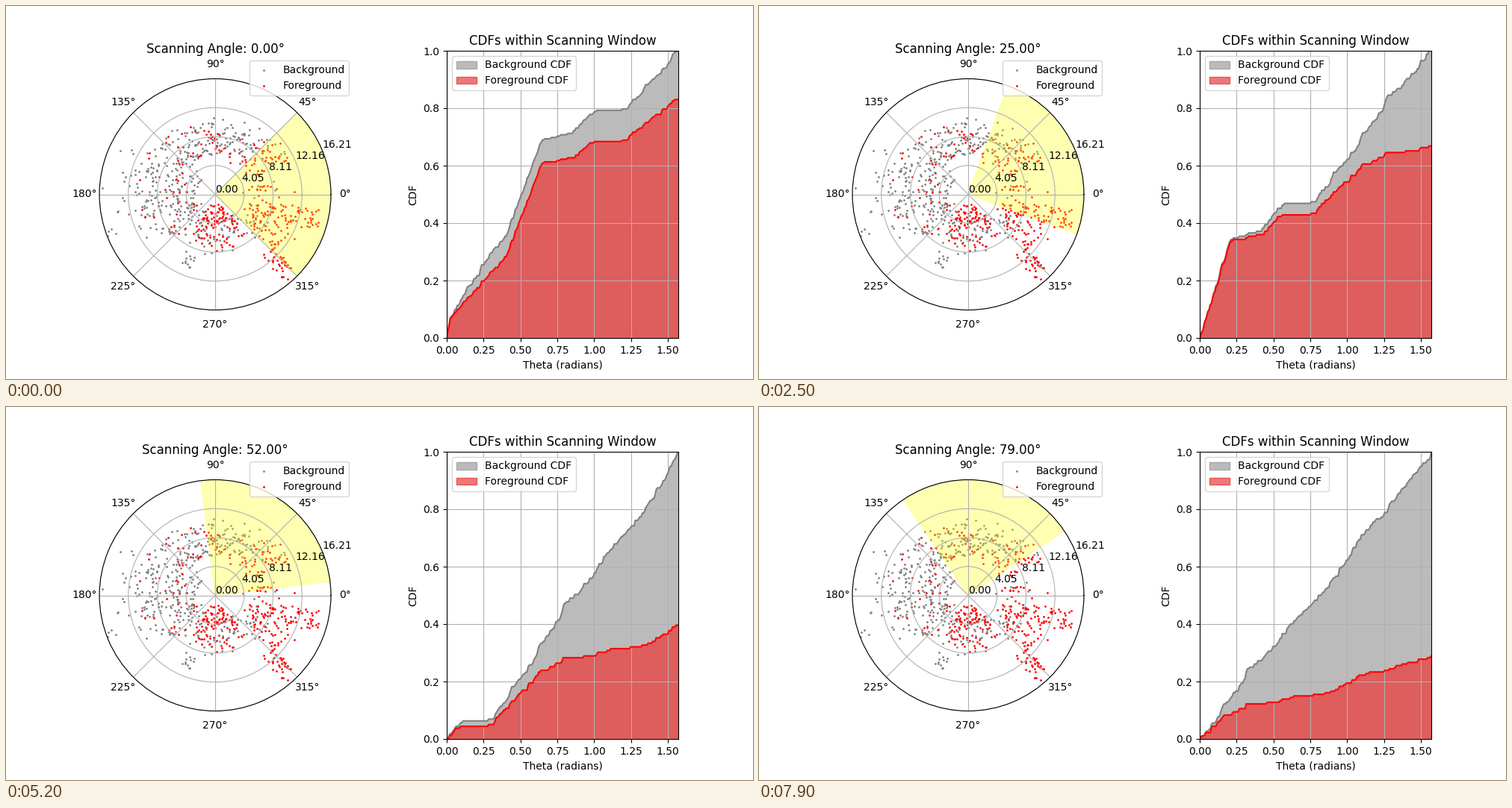
Recreate the animation shown at these times as a matplotlib script. Size 1000x500 px, loop 8000 ms.

```python
import numpy as np
import matplotlib.pyplot as plt
from matplotlib.animation import FuncAnimation
from matplotlib.patches import Patch

FRAMES, STEP_MS = 80, 100
RMAX, HALF = 16.21, 45
RADIUS_PX = 155
GREY_FILL, RED_FILL = "#bbbbbb", "#de5d5d"

# Sectors: points, first and last angle, inner and outer distance in pixels
FORE = [(22, -53, -45, 95, 150), (14, -45, -43.7, 105, 150),
        (46, -44, -22, 42, 130), (69, -22, -8, 45, 152),
        (5, -8, 5, 30, 125), (11, 5, 12, 38, 85), (28, 23, 42, 45, 112),
        (9, 42, 52, 50, 98), (10, 52, 88, 42, 92), (9, 88, 97, 55, 105),
        (12, 97, 124, 50, 100), (38, 124, 240, 20, 110),
        (98, 240, 308, 12, 78)]
BACK = [(14, -45, -28, 40, 85), (10, -28, 28, 35, 90), (8, 28, 42, 75, 115),
        (123, 42, 124, 50, 107), (165, 124, 225, 22, 112),
        (45, 150, 205, 75, 162), (12, 243, 252, 85, 106),
        (60, 225, 315, 25, 85)]

rng = np.random.default_rng(12)


def make_points(sectors):
    deg, r = [], []
    for n, first, last, inner, outer in sectors:
        # Even spacing with jitter gives small clumps but a steady total
        slot = np.arange(n) + 0.5 + rng.normal(0, 1, n)
        deg.append(first + (last - first) * np.clip(slot / n, 0, 1))
        r.append(inner + (outer - inner) * rng.beta(1.7, 1.7, n))
    deg = (np.concatenate(deg) + HALF) % 360 - HALF
    order = np.argsort(deg)
    return deg[order], np.concatenate(r)[order] * RMAX / RADIUS_PX


back, back_r = make_points(BACK)
fore, fore_r = make_points(FORE)

fig = plt.figure(figsize=(10, 5), dpi=100)
fig.subplots_adjust(wspace=0.5)

polar = fig.add_subplot(121, projection="polar")
polar.scatter(np.radians(back), back_r, s=1, c="gray", label="Background")
polar.scatter(np.radians(fore), fore_r, s=1, c="red", label="Foreground")
beam = polar.bar(0, RMAX, width=np.pi / 2, color="yellow",
                 edgecolor="yellow", alpha=0.3)[0]
rings = np.linspace(0, RMAX, 5)
polar.set_ylim(0, RMAX)
polar.set_yticks(rings, [f"{r:.2f}" for r in rings])
polar.legend(loc="upper right", bbox_to_anchor=(1.1, 1.1))
title = polar.set_title("")

cdf = fig.add_subplot(122)
sweep = np.linspace(0, np.pi / 2, 200)
back_fill = cdf.fill_between(sweep, 0 * sweep, color=GREY_FILL, lw=0)
fore_fill = cdf.fill_between(sweep, 0 * sweep, color=RED_FILL, lw=0)
back_line, = cdf.plot([], [], color="gray")
fore_line, = cdf.plot([], [], color="red")
cdf.set(xlim=(0, np.pi / 2), ylim=(0, 1), xlabel="Theta (radians)",
        ylabel="CDF", title="CDFs within Scanning Window")
cdf.grid(True)
cdf.legend(loc="upper left", handles=[
    Patch(fc=GREY_FILL, ec="#a8a8a8", label="Background CDF"),
    Patch(fc="#ee7779", ec="#e65558", label="Foreground CDF")])


def count_from(theta, start):
    ends = start + np.degrees(sweep)
    return np.searchsorted(theta, ends, "right") - np.searchsorted(theta, start)


def show(fill, line, y):
    line.set_data(sweep, y)
    outline = np.column_stack([sweep, y])
    fill.set_verts([np.vstack([(0, 0), outline, (sweep[-1], 0)])])


def update(angle):
    start = angle - HALF
    beam.set_x(np.radians(start))
    title.set_text(f"Scanning Angle: {angle:.2f}°")
    red = count_from(fore, start)
    both = red + count_from(back, start)
    show(back_fill, back_line, both / both[-1])
    show(fore_fill, fore_line, red / both[-1])
    return beam, title, back_fill, fore_fill, back_line, fore_line


anim = FuncAnimation(fig, update, frames=FRAMES, interval=STEP_MS,
                     repeat=True, repeat_delay=0, blit=False)
plt.show()
```
